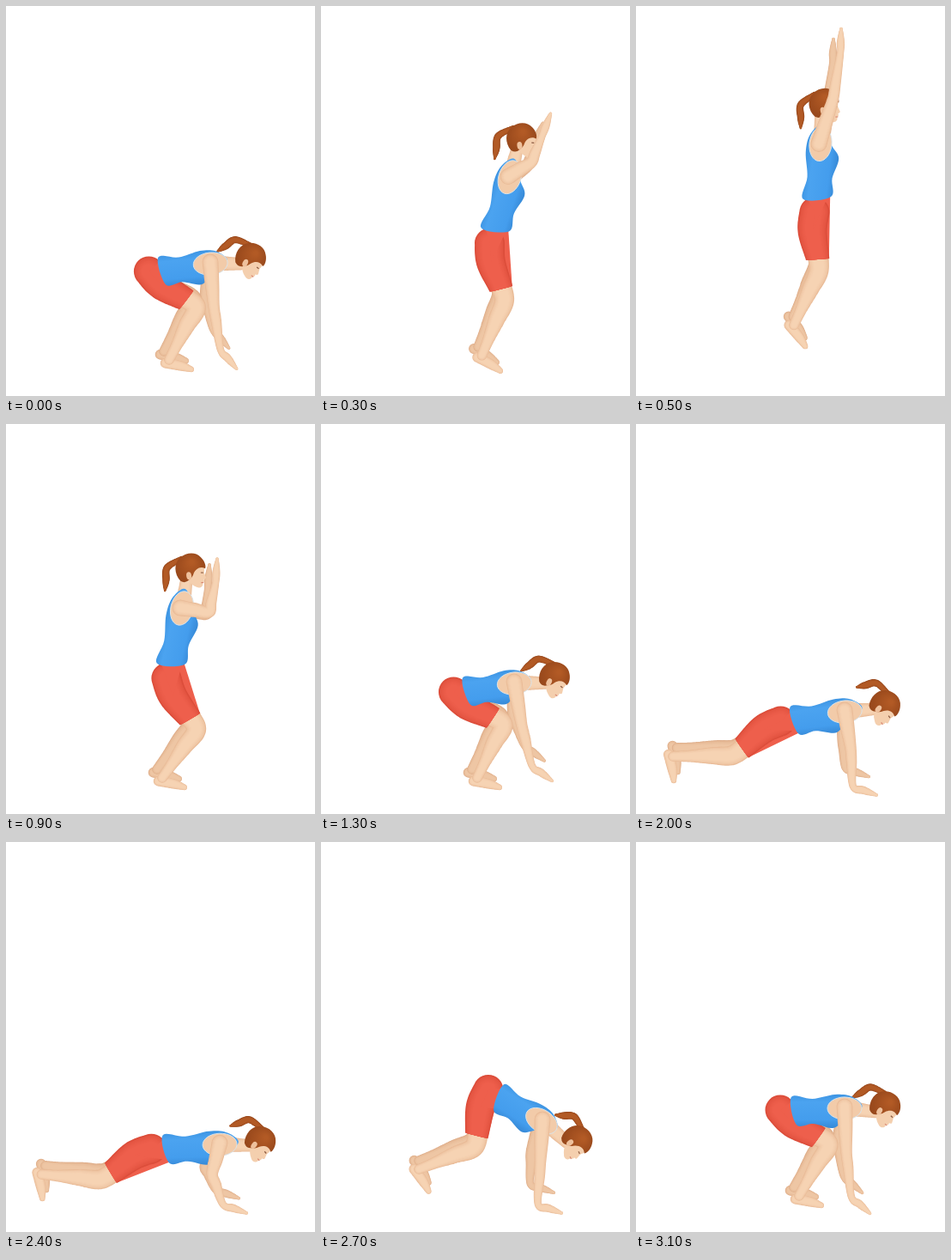
Write an HTML page with a canvas that moves like this. It is 360x454 px and loops after 3.2 s.

```html
<!DOCTYPE html>
<html lang="en">
<head>
<meta charset="utf-8">
<title>Burpee</title>
<style>
html, body { margin: 0; width: 100%; height: 100%; overflow: hidden; background: #fff; }
canvas { display: block; }
</style>
</head>
<body>
<canvas id="stage" width="360" height="454"></canvas>
<script>
const ctx = document.getElementById('stage').getContext('2d');
const STEP = 100, STEPS = 32;
const BONE = 69, FOOT = 28, HAND = 29, NECK = 46, TAIL = 38;

const SKIN = ['#e9bb97', '#f6d3b3'];
const FAR_SKIN = ['#dfae8a', '#eec6a4'];
const HAIR = ['#93451a', '#b25a25'];
const RED = ['#dc4d3a', '#ee5f4c'];

// Contact points with the floor.
const BACK = [190, 412], FEET = [182, 412], HANDS = [253, 422];

// Angles are in degrees; bend pushes the elbow out of the arm's line.
const pose = (hip, chest, ankle, foot, wrist, hand, bend = 2, nod = 0) =>
  ({ hip, chest, ankle, foot: [foot], wrist, hand: [hand], bend: [bend], nod: [nod] });

const crouch = pose([166, 305], [238, 298], BACK, 23, [250, 400], 50);
const rise = pose([184, 280], [222, 206], BACK, 23, [272, 205], -55, 14);
const reach = pose([204, 268], [213, 189], [184, 400], 62, [238, 84], -88, 4);
const absorb = pose([183, 295], [203, 214], FEET, 23, [244, 186], -86, 23);
const drop = pose([156, 302], [218, 256], FEET, 23, [270, 310], 45, 6);
const squat = pose([154, 308], [225, 300], FEET, 23, [246, 398], 37);
const lean = pose([163, 305], [245, 309], FEET, 30, HANDS, 20);
const kick = pose([186, 299], [257, 327], [82, 385], 78, HANDS, 20);
const plank = pose([168, 342], [243, 333], [43, 387], 88, HANDS, 20, -2, 15);
const low = pose([171, 370], [258, 376], [39, 387], 88, HANDS, 20, 30);
const pike = pose([197, 285], [258, 323], [114, 381], 66, HANDS, 20, 0, 7);
const land = pose([168, 308], [243, 308], BACK, 23, [251, 413], 42);

const keys = [[0, crouch], [2, rise], [4.3, reach], [7, reach], [9, absorb], [11, drop], [13, squat],
  [15, lean], [18, kick], [19, plank], [20, plank], [22.5, low], [25, plank], [27, pike],
  [30, land], [31, land], [STEPS, crouch]];

const mix = (a, b, k) => a.map((v, i) => v + (b[i] - v) * k);
const add = (a, b, k = 1) => [a[0] + b[0] * k, a[1] + b[1] * k];
const sub = (a, b) => [a[0] - b[0], a[1] - b[1]];
const unit = a => { const d = Math.hypot(...a) || 1; return [a[0] / d, a[1] / d]; };
const turn = a => [-a[1], a[0]];
const rad = deg => deg * Math.PI / 180;
const polar = (deg, r = 1) => [Math.cos(rad(deg)) * r, Math.sin(rad(deg)) * r];
const rgb = hex => [1, 3, 5].map(i => parseInt(hex.slice(i, i + 2), 16));

function poseAt(t) {
  const i = keys.findIndex(k => k[0] > t);
  const [t0, a] = keys[i - 1], [t1, b] = keys[i];
  const p = {};
  for (const part in a) p[part] = mix(a[part], b[part], (t - t0) / (t1 - t0));
  const lift = Math.max(0, 36 * (1 - ((t - 6) / 2.2) ** 2));
  for (const part of ['hip', 'chest', 'ankle', 'wrist']) p[part][1] -= lift;
  return p;
}

// Knee of a leg with two equal bones, bent forwards.
function kneeOf(hip, ankle) {
  const d = sub(ankle, hip), half = Math.hypot(...d) / 2;
  return add(mix(hip, ankle, 0.5), turn(unit(d)), -Math.sqrt(Math.max(0, BONE ** 2 - half ** 2)));
}

function spline(a, b, c, d, k) {
  return b.map((v, i) => v + 0.5 * k * (c[i] - a[i] +
    k * (2 * a[i] - 5 * v + 4 * c[i] - d[i] + k * (3 * (v - c[i]) + d[i] - a[i]))));
}

// A soft tube through [x, y, radius] nodes, lighter towards its core.
function tube(nodes, [edge, core]) {
  const dots = [], at = i => nodes[Math.max(0, Math.min(nodes.length - 1, i))];
  for (let i = 0; i < nodes.length - 1; i++) {
    const n = Math.max(6, Math.ceil(Math.hypot(...sub(at(i + 1), at(i)))));
    for (let j = 0; j <= n; j++) dots.push(spline(at(i - 1), at(i), at(i + 1), at(i + 2), j / n));
  }
  for (let layer = 0; layer < 6; layer++) {
    ctx.fillStyle = `rgb(${mix(rgb(edge), rgb(core), Math.sqrt(layer / 5))})`;
    ctx.beginPath();
    for (const [x, y, r] of dots) {
      const s = Math.max(0.3, r * (1 - layer * 0.1));
      ctx.moveTo(x + s, y);
      ctx.arc(x, y, s, 0, 7);
    }
    ctx.fill();
  }
}

function closedCurve(pts) {
  const at = i => pts[(i + pts.length) % pts.length];
  ctx.beginPath();
  pts.forEach((_, i) => {
    for (let j = 0; j < 8; j++) ctx.lineTo(...spline(at(i - 1), at(i), at(i + 1), at(i + 2), j / 8));
  });
  ctx.closePath();
}

function fillPolygon(pts, colour) {
  ctx.fillStyle = colour;
  ctx.beginPath();
  pts.forEach(q => ctx.lineTo(...q));
  ctx.fill();
}

function arm(s, w, hand, bend, tone) {
  const e = add(mix(s, w, 0.5), turn(unit(sub(w, s))), bend);
  const f = add(w, polar(hand, HAND));
  tube([[...s, 9.5], [...mix(s, e, 0.5), 8.4], [...e, 6.8], [...mix(e, w, 0.35), 6.3],
    [...w, 4.2], [...mix(w, f, 0.45), 4.6], [...f, 1.8]], tone);
}

function leg(h, k, a, foot, tone) {
  const d = polar(foot), n = turn(d), t = add(a, d, FOOT);
  const heel = add(add(a, d, -2.5), n, 5);
  tube([[...heel, 6], [...add(mix(heel, t, 0.55), n, -1), 5.8], [...t, 3.2]], tone);
  tube([[...mix(h, k, 0.7), 12], [...k, 11.5], [...mix(k, a, 0.35), 9.8],
    [...mix(k, a, 0.7), 7], [...a, 5.8]], tone);
}

function torso(local, v) {
  closedCurve([local(0.17, -11), local(0.5, -9), local(0.85, -14), local(1.1, -12), local(1.27, -2),
    local(1.2, 7), local(1, 15), local(0.82, 25), local(0.52, 20), local(0.25, 21)]);
  const g = ctx.createLinearGradient(...local(0.6, -16), ...local(0.6, 26));
  g.addColorStop(0, '#3a91df');
  g.addColorStop(0.25, '#4ba3f0');
  g.addColorStop(0.75, '#449ded');
  g.addColorStop(1, '#3587d4');
  ctx.fillStyle = g;
  ctx.fill();

  ctx.beginPath();
  ctx.ellipse(...local(1, 2), 20, 13, Math.atan2(-v[0], v[1]), 0, 7);
  ctx.fillStyle = '#f2cba9';
  ctx.fill();
  ctx.strokeStyle = '#dbe3e8';
  ctx.lineWidth = 1;
  ctx.stroke();
}

function shorts(local, p, knee) {
  const d = unit(sub(knee, p)), n = turn(d), hem = mix(p, knee, 0.8);
  const seat = add(mix(p, hem, 0.4), n, 4);
  ctx.save();
  // Keep everything above the hem line.
  ctx.beginPath();
  for (const [side, up] of [[80, 0], [-80, 0], [-80, -160], [80, -160]]) {
    ctx.lineTo(...add(add(hem, n, side), d, up));
  }
  ctx.clip();
  fillPolygon([local(0.19, -11), local(0.26, 20), add(hem, n, -13), p], RED[1]);
  tube([[...p, 17.5], [...seat, 17], [...hem, 13.5], [...knee, 12.5]], RED);
  fillPolygon([local(0.22, -8), local(0.27, 18), seat, p], RED[1]);
  ctx.restore();
}

function head(c, tilt) {
  ctx.save();
  ctx.translate(...c);
  ctx.rotate(rad(tilt));
  ctx.fillStyle = '#f4cfae';
  ctx.beginPath();
  ctx.moveTo(-8, -10);
  ctx.lineTo(14, -10);
  ctx.bezierCurveTo(18, -5, 17, 1, 17, 3);
  ctx.lineTo(19.5, 8.5);
  ctx.quadraticCurveTo(19, 10.5, 17, 10.5);
  ctx.quadraticCurveTo(18.5, 13, 16, 15);
  ctx.bezierCurveTo(17, 19, 13, 22, 9, 20);
  ctx.quadraticCurveTo(3, 18, -1, 13);
  ctx.lineTo(-8, 12);
  ctx.fill();

  const g = ctx.createRadialGradient(2, -9, 2, 0, -2, 21);
  g.addColorStop(0, HAIR[1]);
  g.addColorStop(1, HAIR[0]);
  ctx.fillStyle = g;
  ctx.beginPath();
  ctx.moveTo(-10, 14);
  ctx.bezierCurveTo(-18, 6, -19, -6, -12, -13);
  ctx.bezierCurveTo(-5, -20, 6, -21, 12, -15);
  ctx.bezierCurveTo(17, -11, 19, -5, 18, -2);
  ctx.bezierCurveTo(12, -5, 7, -1, 5, 4);
  ctx.quadraticCurveTo(4, 9, 0, 12);
  ctx.quadraticCurveTo(-4, 17, -10, 14);
  ctx.fill();

  ctx.fillStyle = '#eec19d';
  ctx.beginPath();
  ctx.ellipse(-0.5, 7.5, 3, 4.5, -0.2, 0, 7);
  ctx.fill();
  ctx.lineWidth = 1.2;
  for (const [colour, x, y] of [['#8b5a40', 13, 3], ['#d98973', 14, 14.5]]) {
    ctx.strokeStyle = colour;
    ctx.beginPath();
    ctx.moveTo(x, y);
    ctx.lineTo(x + 3, y);
    ctx.stroke();
  }
  ctx.restore();
}

function draw(t) {
  const { hip, chest, ankle, foot: [foot], wrist, hand: [hand], bend: [bend], nod: [nod] } = poseAt(t);
  const spine = sub(chest, hip), up = unit(spine), v = turn(up);
  const local = (along, front) => add(add(hip, spine, along), v, front);
  const pelvis = add(hip, v, 4), knee = kneeOf(pelvis, ankle);

  // The head follows the spine and tips half as far as it leans.
  const lean = Math.atan2(up[0], -up[1]) * 180 / Math.PI;
  const tilt = (lean - 8) / 2 + nod;
  const skull = add(chest, up, NECK);
  const onHead = (x, y) => add(add(skull, polar(tilt), x), turn(polar(tilt)), y);

  // Far limbs sit a little behind the near ones.
  const height = Math.max(-0.5, Math.min(1, (wrist[1] - chest[1]) / 100));
  const farWrist = add(wrist, [-9, -24 * height]);
  const footShift = [5 - 12 * Math.cos(rad(foot)), -10];

  ctx.fillStyle = '#fff';
  ctx.fillRect(0, 0, 360, 454);

  arm(add(chest, v, 3), farWrist, hand, bend + 5 * height, FAR_SKIN);
  leg(pelvis, add(knee, footShift, 0.7), add(ankle, footShift), foot, FAR_SKIN);

  const root = onHead(-10, -12), tip = add(skull, polar(135 + 1.5 * tilt, TAIL));
  const curl = add(mix(root, tip, 0.4), turn(sub(tip, root)), 0.24);
  tube([[...root, 3], [...curl, 4], [...mix(curl, tip, 0.55), 4.2], [...tip, 1.2]], HAIR);

  tube([[...local(1.08, 2), 9], [...onHead(-3, 11), 7]], SKIN);
  leg(pelvis, knee, ankle, foot, SKIN);
  shorts(local, pelvis, knee);
  torso(local, v);
  head(skull, tilt);
  arm(chest, wrist, hand, bend, SKIN);
}

const start = performance.now();
let shown = -1;
function tick() {
  const step = Math.floor((performance.now() - start) / STEP) % STEPS;
  if (step !== shown) draw(shown = step);
  requestAnimationFrame(tick);
}
tick();
</script>
</body>
</html>
```
